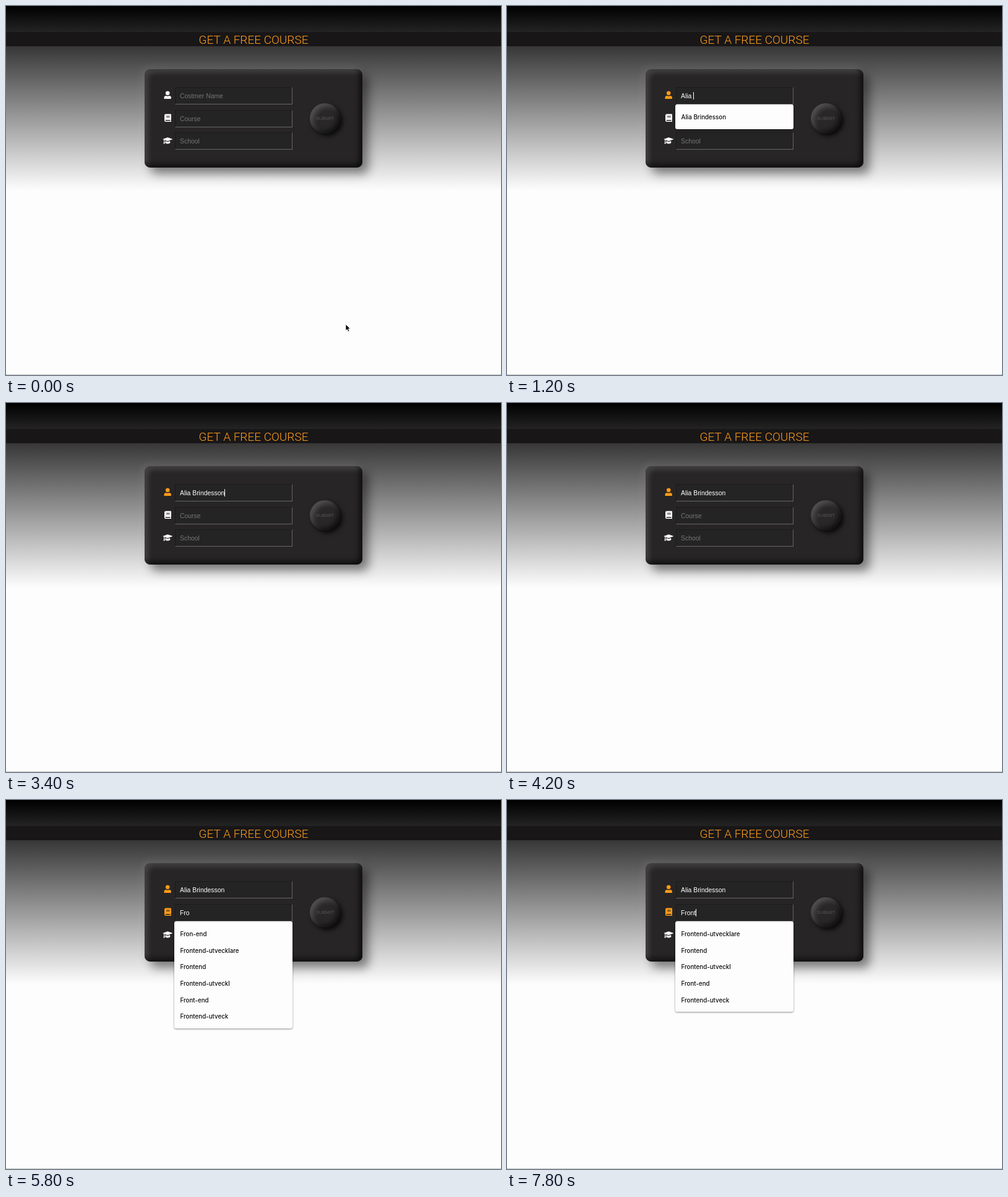
An HTML page that plays this animation: 800 px wide and 596 px high, repeating every 8000 ms.

```html
<!DOCTYPE html>
<html lang="en">
<head>
<meta charset="utf-8">
<title>Get a free course</title>
<style>
  html, body { margin: 0; width: 100%; height: 100%; overflow: hidden; }
  #stage {
    position: relative; width: 800px; height: 596px; overflow: hidden;
    background: linear-gradient(#000, #fefdfe 50%);
  }
  #stage * { position: absolute; box-sizing: border-box; }
  h1 {
    left: 0; top: 42px; width: 800px; height: 23px; margin: 0;
    background: #191617; color: #ff9f1c; text-align: center;
    font: 300 19px/25px Roboto, sans-serif;
  }
  .card {
    left: 224px; top: 102px; width: 352px; height: 159px; border-radius: 9px;
    background: #272526;
    box-shadow: 10px 10px 16px rgba(0,0,0,.45), -4px -4px 14px rgba(255,255,255,.08),
      inset -5px -5px 8px rgba(0,0,0,.6), inset 5px 5px 8px rgba(255,255,255,.15);
  }
  .submit {
    left: 491px; top: 157px; width: 49px; height: 49px; border-radius: 50%;
    background: #292728; color: #555354; text-align: center;
    font: 7.9px/50px "Liberation Sans", Arial, sans-serif;
    box-shadow: 4px 4px 7px rgba(0,0,0,.75),
      inset -4px -4px 7px rgba(0,0,0,.55), inset 5px 5px 8px rgba(255,255,255,.2);
  }
  .field {
    left: 273px; width: 190px; height: 28px; padding-left: 7px;
    border: 1px solid; border-color: #1c1b1b #686767 #686767 #1c1b1b;
    background: #252424; color: #fff; white-space: pre;
    font: 10.4px/28px "Liberation Sans", Arial, sans-serif;
  }
  #stage .field span { position: static; }
  #stage .field i { position: relative; display: inline-block; width: 0; height: 12px; vertical-align: -2px; }
  .field i::after { content: ""; position: absolute; left: 0; top: 0; width: 1px; height: 12px; background: #fff; }
  .field .hint { color: #757575; }
  .menu {
    left: 272px; width: 191px; padding: 8px 9.5px 5px; border-radius: 3px;
    background: #fefdfe; color: #0c0c0c;
    font: 500 9.75px/26.65px Inter, sans-serif;
    box-shadow: 0 1px 3px rgba(0,0,0,.45);
  }
  #stage .menu div { position: static; height: 26.65px; white-space: pre; }
  svg { left: 0; top: 0; }
  .rule { left: 0; top: 595px; width: 800px; height: 1px; background: #bfc3bf; }
</style>
</head>
<body>
<div id="stage">
  <div class="card"></div>
  <h1>GET A FREE COURSE</h1>
  <div class="submit">SUBMIT</div>
  <svg width="800" height="596" fill="#fff">
    <g class="icon">
      <circle cx="261.2" cy="140.8" r="3.3"/>
      <path d="M255.5 150V148.2Q255.5 145 258.8 145Q261.2 146 263.6 145Q266.9 145 266.9 148.2V149Q266.9 150 265.9 150H256.5Z"/>
    </g>
    <g class="icon">
      <path fill-rule="evenodd" d="M258.2 174.6H266.2Q267 174.6 267 175.4V183.2Q267 183.8 266.5 184.1V185.6H267V187H258.2Q256 187 256 184.8V176.8Q256 174.6 258.2 174.6ZM259 177.6V178.5H264.7V177.6ZM259 179.4V180.3H264.7V179.4ZM258.3 184Q257.5 184 257.5 184.8T258.3 185.6H265.3V184Z"/>
    </g>
    <g class="icon">
      <path d="M261.3 212.2L268.6 214.8Q269.4 215.2 268.6 215.6L261.3 218.2L256.2 216.4V219.3L256.9 222.6H254.4L255.1 219.3V216L254 215.6Q253.2 215.2 254 214.8Z"/>
      <path d="M257.6 218L261.3 219.4L265 218L265.4 221Q261.3 224 257.2 221Z"/>
    </g>
  </svg>
  <div class="rule"></div>
  <div class="menu"></div>
  <svg id="pointer" width="800" height="596">
    <path d="M549 514V524.4L551.4 522.2L553 526L554.9 525.2L553.3 521.5H556.5Z" stroke="#fff" stroke-width=".8"/>
  </svg>
</div>
<script>
const LOOP = 8000, STEP = 200, HIDE_POINTER = 600;
const NAME = 'Alia Brindesson';
const ORANGE = '#ff9c18';

const fields = [
  { hint: 'Costmer Name', top: 131, lit: 800,
    options: [NAME, 'Alia', 'al', 'a', 'Ali', 'ALia'] },
  { hint: 'Course', top: 168, lit: 5000,
    options: ['Fron-end', 'Frontend-utvecklare', 'Frontend', 'Frontend-utveckl', 'Front-end', 'Frontend-utveck'] },
  { hint: 'School', top: 204.4, lit: Infinity, options: [] }
];

// [time, focused field, typed text]
const steps = [
  [0, -1, ''], [200, 0, ''], [600, 0, 'A'], [800, 0, 'Al'], [1000, 0, 'Alia'], [1200, 0, 'Alia '],
  ...[1800, 2000, 2200, 2400, 2600, 2800, 3000, 3200].map((t, i) => [t, 0, NAME.slice(0, 6 + i)]),
  [3400, 0, NAME], [3600, 1, ''],
  [4800, 1, 'F'], [5000, 1, 'Fr'], [5200, 1, 'Fro'], [7600, 1, 'Fron'], [7800, 1, 'Front']
];

const stage = document.getElementById('stage');
const menu = document.querySelector('.menu');
const pointer = document.getElementById('pointer');
const icons = document.querySelectorAll('.icon');

for (const field of fields) {
  field.box = document.createElement('div');
  field.box.className = 'field';
  field.box.style.top = field.top + 'px';
  field.text = document.createElement('span');
  field.caret = document.createElement('i');
  field.box.append(field.text, field.caret);
  stage.insertBefore(field.box, menu);
}

function showMenu(field, value) {
  const found = field && value
    ? field.options.filter(o => o.toLowerCase().startsWith(value.toLowerCase())) : [];
  const hidden = !found.length || (found.length === 1 && found[0] === value);
  menu.style.display = hidden ? 'none' : 'block';
  if (hidden) return;
  menu.style.top = field.top + 28 + 'px';
  menu.replaceChildren(...found.map(option => {
    const row = document.createElement('div');
    row.textContent = option;
    return row;
  }));
}

function render(t) {
  const [since, focus, value] = steps.filter(s => s[0] <= t).pop();
  fields.forEach((field, i) => {
    const text = i === focus ? value : i < focus ? NAME : '';
    const caretOn = i === focus && (t - since) % 1000 < 500;
    field.text.textContent = text || field.hint;
    field.text.className = text ? '' : 'hint';
    field.caret.style.visibility = caretOn ? 'visible' : 'hidden';
    // An empty field keeps its caret before the hint.
    field.box.insertBefore(field.caret, text ? null : field.text);
    icons[i].setAttribute('fill', t >= field.lit ? ORANGE : '#fff');
  });
  showMenu(fields[focus], value);
  pointer.style.display = t < HIDE_POINTER ? 'block' : 'none';
}

const start = performance.now();
let shown = -1;
function tick() {
  const t = Math.floor((performance.now() - start) % LOOP / STEP) * STEP;
  if (t !== shown) render(shown = t);
  requestAnimationFrame(tick);
}
tick();
</script>
</body>
</html>
```
